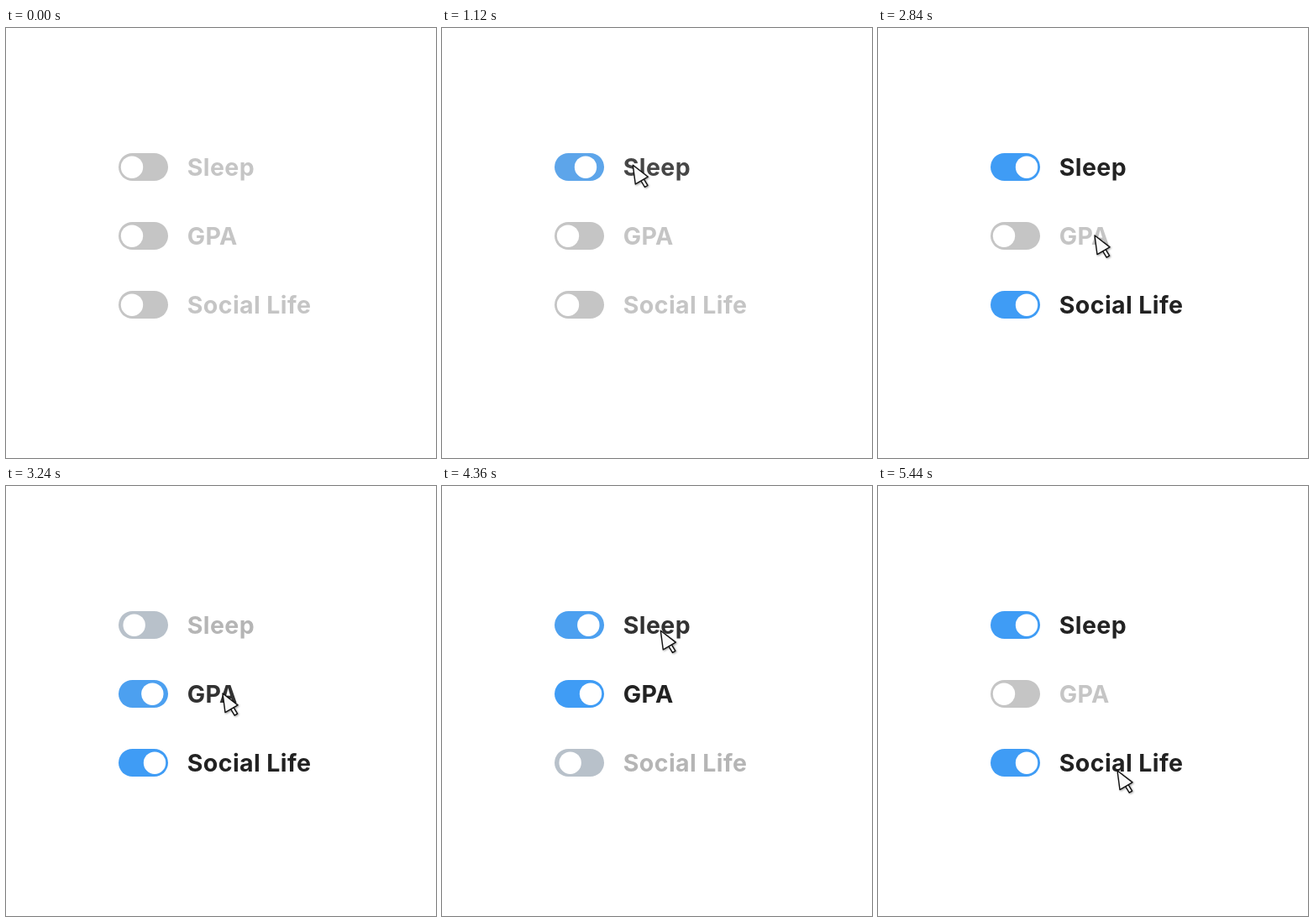
An HTML page for the animation above (5640 ms loop, 512 by 512 pixels).

```html
<!DOCTYPE html>
<html lang="en">
<head>
<meta charset="utf-8">
<title>Pick two</title>
<style>
  html, body { margin: 0; width: 100%; height: 100%; overflow: hidden; background: #fff; }
  svg { display: block; width: 100vw; height: 100vh; }
  text { font: 700 28.5px Inter, "Open Sans", sans-serif; letter-spacing: 0.4px; }
  #cursor { filter: drop-shadow(1.4px 1px 0.8px rgba(0, 0, 0, 0.38)); }
</style>
</head>
<body>
<svg viewBox="0 0 512 512">
  <g id="rows"></g>
  <g id="cursor" fill="#f9f9f9" stroke="#111" stroke-width="1.4" stroke-linejoin="round">
    <path d="M9.6 18.6L14.2 26.2L17.6 24.1L13 16.6Z"/>
    <path d="M0 0L18 13.9L3 22.6Z"/>
  </g>
</svg>
<script>
const LOOP = 5640, STEP = 40, TOGGLE = 360;
const GREY = [197, 197, 197], BLUE = [63, 156, 245], INK = [34, 34, 34];

// Each row flips its state at the listed times.
const rows = [
  { label: "Sleep", y: 165.5, flips: [880, 2960, 4080] },
  { label: "GPA", y: 247.5, flips: [2960, 5080] },
  { label: "Social Life", y: 329.5, flips: [1920, 4080, 5080] }
];

// Cursor moves; bow bends the path sideways.
const moves = [
  { start: 1230, end: 1670, from: [227.3, 163.3], to: [242, 327.3], bow: -2.5 },
  { start: 2320, end: 2840, from: [242, 327.3], to: [258, 247], bow: -0.6 },
  { start: 3480, end: 3940, from: [258, 247], to: [260.3, 172.2], bow: 0 },
  { start: 4680, end: 5100, from: [260.3, 172.2], to: [285, 339], bow: 0 }
];

const clamp = v => Math.min(1, Math.max(0, v));
const mix = (a, b, p) => a + (b - a) * p;
const inOut = x => x < 0.5 ? 2 * x * x : 1 - 2 * (1 - x) ** 2;
const color = (a, b, p) => `rgb(${a.map((v, i) => Math.round(mix(v, b[i], p)))})`;

function add(parent, tag, attrs) {
  const el = document.createElementNS("http://www.w3.org/2000/svg", tag);
  for (const key in attrs) el.setAttribute(key, attrs[key]);
  return parent.appendChild(el);
}

const group = document.getElementById("rows");
const cursor = document.getElementById("cursor");
for (const row of rows) {
  row.track = add(group, "rect", { x: 134, y: row.y - 16.5, width: 59, height: 33, rx: 16.5 });
  row.knob = add(group, "circle", { cy: row.y + 0.2, r: 13.2, fill: "#fff" });
  row.text = add(group, "text", { x: 215.8, y: row.y + 10.8 });
  row.text.textContent = row.label;
}

function level(flips, t) {
  return flips.reduce((sum, start, i) => {
    const p = inOut(clamp((t - start) / TOGGLE));
    return sum + (i % 2 ? -p : p);
  }, 0);
}

function cursorAt(t) {
  if (t < moves[0].start) {
    const left = 1 - clamp(t / 640);
    return [227.3 + 292 * left * left, 163.3 + 121.5 * left * left];
  }
  const move = moves.filter(m => t >= m.start).pop();
  const p = inOut(clamp((t - move.start) / (move.end - move.start)));
  const [x, y] = move.from.map((v, i) => mix(v, move.to[i], p));
  return [x + move.bow * 4 * p * (1 - p), y];
}

function draw(t) {
  for (const row of rows) {
    const p = level(row.flips, t);
    row.track.setAttribute("fill", color(GREY, BLUE, p));
    row.text.setAttribute("fill", color(GREY, INK, p));
    row.knob.setAttribute("cx", mix(150, 177, p));
  }
  cursor.setAttribute("transform", `translate(${cursorAt(t)})`);
}

const origin = performance.now();
function tick() {
  const t = (performance.now() - origin) % LOOP;
  draw(Math.floor(t / STEP) * STEP);
  requestAnimationFrame(tick);
}
tick();
</script>
</body>
</html>
```
